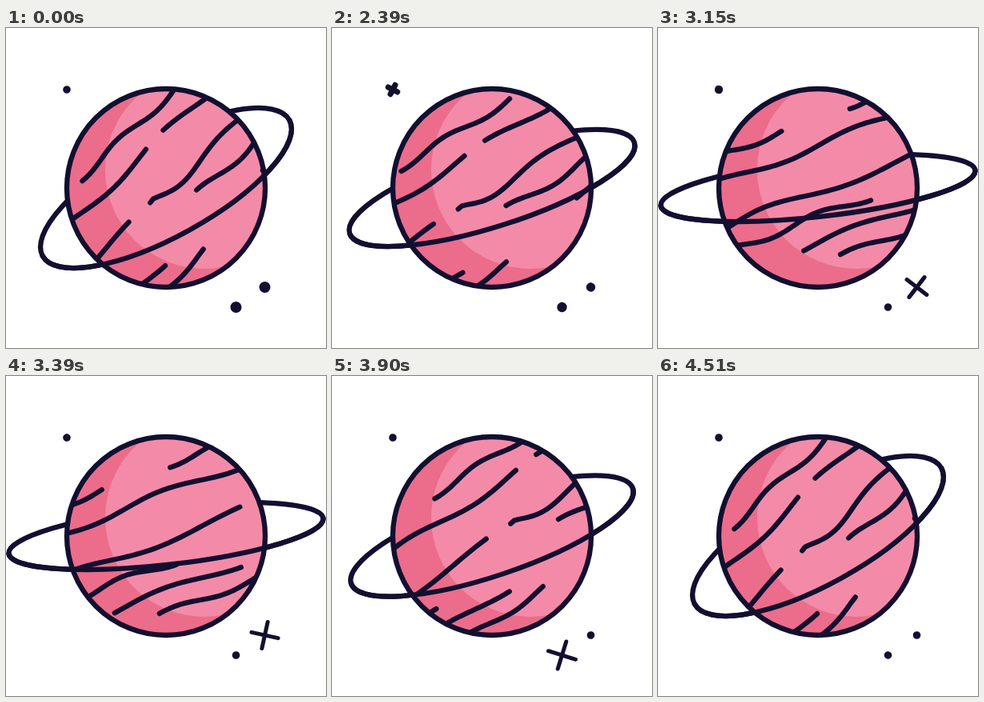
Write an HTML page with a canvas that moves like this. It is 400 px wide and 400 px high and loops after 4.54 s.

```html
<!DOCTYPE html>
<html lang="en">
<head>
<meta charset="utf-8">
<title>Spinning planet</title>
<style>
  html, body { margin: 0; width: 100%; height: 100%; overflow: hidden; background: #fff; }
  canvas { display: block; width: 400px; height: 400px; }
</style>
</head>
<body>
<canvas id="stage" width="400" height="400"></canvas>
<script>
const ctx = document.getElementById('stage').getContext('2d');
const LOOP = 4540, START = 2030, SPIN_END = 4480;
const INK = '#130f30', DARK = '#eb6d8b', LIGHT = '#f38ba8';
const RADIUS = 124, TRAVEL = 389, LINE = 6.3;

// A stripe is a cosine wave along a row; rows near the poles travel slower.
const stripes = [
  { row: -82, from: -70, to: 93, speed: 0.65, bend: 4, waves: 1.33, peak: 0.04, skew: 1 },
  { row: -50, from: 47, to: 404, speed: 1, bend: 5, waves: 1.82, peak: 0.27, skew: 1 },
  { row: 4, from: -27, to: 326, speed: 1, bend: 5.5, waves: 2.04, peak: 0.3, skew: 0.6 },
  { row: 33, from: 26, to: 226, speed: 1, bend: 5, waves: 1.5, peak: 0.33, skew: 1 },
  { row: 65, from: 103, to: 271, speed: 0.87, bend: 5, waves: 0.8, peak: 1.02, skew: 1 },
  { row: 90, from: 112, to: 246, speed: 0.68, bend: 4, waves: 1, peak: 0.65, skew: 1 }
];

// Dots that open into turning crosses, one after the other.
const sparkles = [
  { x: 76, y: 77, angle: 0, swell: 0 },
  { x: 323.5, y: 324, angle: 41, swell: 4.4 },
  { x: 287.5, y: 349, angle: 20, swell: 4.4 }
];

const radians = degrees => degrees * Math.PI / 180;
const progress = (t, from, to) => Math.min(1, Math.max(0, (t - from) / (to - from)));
const smooth = u => u * u * (3 - 2 * u);
const mix = (a, b, u) => a + (b - a) * u;

function tiltAt(t) {
  const u = progress(t, START, 3270);
  return smooth(u * (2 - u)) - smooth(progress(t, 3425, 4320));
}

function circle(x, y) {
  ctx.beginPath();
  ctx.arc(x, y, RADIUS, 0, 2 * Math.PI);
}

function disc(x, y, color) {
  ctx.fillStyle = color;
  circle(x, y);
  ctx.fill();
}

function drawStripe({ row, from, to, bend, waves, peak, skew }, shift) {
  const steps = 60;
  ctx.beginPath();
  for (let i = 0; i <= steps; i++) {
    const s = i / steps;
    const y = row + bend * Math.cos(2 * Math.PI * waves * (s ** skew - peak));
    ctx.lineTo(mix(from, to, s) + shift, y);
  }
  ctx.stroke();
}

function drawPlanet(t) {
  const tilt = tiltAt(t);
  const ringAngle = mix(28.85, 6.4, tilt);
  const ring = end => {
    ctx.beginPath();
    ctx.ellipse(0, 0, mix(176.1, 197.7, tilt), mix(60.2, 35.9, tilt), -radians(ringAngle), 0, end);
    ctx.stroke();
  };

  ctx.save();
  ctx.translate(200, 200);
  ctx.lineWidth = LINE;
  ring(2 * Math.PI);

  ctx.save();
  disc(0, 0, DARK);
  ctx.clip();
  disc(48, -23, LIGHT);
  ctx.rotate(-radians(ringAngle + 14.5));
  const travel = TRAVEL * smooth(progress(t, START, SPIN_END));
  for (const stripe of stripes) {
    for (const copy of [-1, 0, 1]) drawStripe(stripe, stripe.speed * (copy * TRAVEL - travel));
  }
  ctx.restore();

  circle(0, 0);
  ctx.stroke();
  ring(Math.PI);
  ctx.restore();
}

function drawSparkle({ x, y, angle, swell }, i, t) {
  const start = 2290 + 570 * i;
  const open = Math.sin(Math.PI * progress(t, start, start + 870));
  const extra = swell * (1 - progress(t, START, START + 270 + 350 * i));
  const length = Math.max(0.01, 18 * open);
  ctx.save();
  ctx.translate(x, y);
  ctx.rotate(radians(0.27 * (t - start) - angle));
  ctx.lineWidth = 5 + 4.6 * (1 - open) ** 1.8 + extra;
  ctx.beginPath();
  ctx.moveTo(-length, 0);
  ctx.lineTo(length, 0);
  ctx.moveTo(0, -length);
  ctx.lineTo(0, length);
  ctx.stroke();
  ctx.restore();
}

function draw() {
  const t = performance.now() % LOOP;
  ctx.fillStyle = '#fff';
  ctx.fillRect(0, 0, 400, 400);
  ctx.strokeStyle = INK;
  ctx.lineCap = ctx.lineJoin = 'round';
  drawPlanet(t);
  sparkles.forEach((sparkle, i) => drawSparkle(sparkle, i, t));
  requestAnimationFrame(draw);
}
draw();
</script>
</body>
</html>
```
